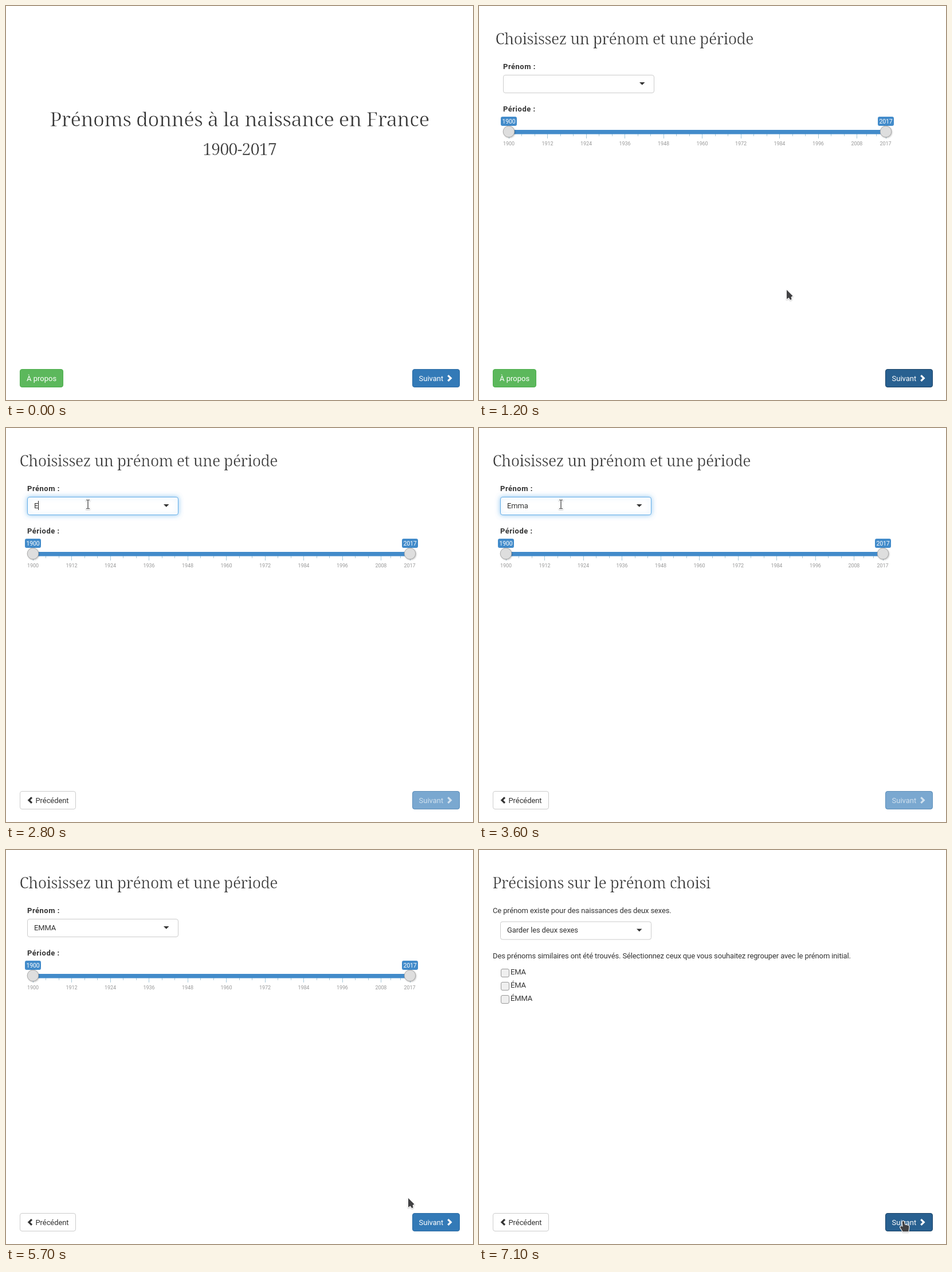
These frames come from a looping animation (815x687 px, 8 s). An HTML page with a canvas:

```html
<!DOCTYPE html>
<html lang="fr">
<head>
<meta charset="utf-8">
<title>Prénoms</title>
<style>
  html, body { margin: 0; width: 100%; height: 100%; overflow: hidden; background: #fff; }
  canvas { display: block; width: 815px; height: 687px; }
</style>
</head>
<body>
<canvas id="stage"></canvas>
<script>
const W = 815, H = 687, LOOP = 8000;
const canvas = document.getElementById('stage');
const ctx = canvas.getContext('2d');
const dpr = window.devicePixelRatio || 1;
canvas.width = W * dpr;
canvas.height = H * dpr;

const SANS = 'Roboto, sans-serif';
const SERIF = '"Noto Serif", serif';
const INK = '#333', BLUE = '#428bca';
const PAGE = 777, PAGE_MS = 400, FIRST_MOVE = 843, SECOND_MOVE = 6564.3;

// Pointer: time, hotspot x, hotspot y, kind. The screen refreshes only at these times.
const pointer = [
  [0, 0, 0, ''],
  [300, 764, 676, 'arrow'], [400, 757, 668, 'arrow'], [500, 750, 662, 'hand'],
  [600, 747, 660, 'hand'], [700, 746, 659, 'hand'],
  [900, 738, 652, 'hand'], [1000, 690, 616, 'arrow'], [1100, 616, 557, 'arrow'],
  [1200, 537, 495, 'arrow'], [1300, 440, 413, 'arrow'], [1400, 340, 322, 'arrow'],
  [1500, 248, 228, 'arrow'], [1600, 178, 156, 'arrow'], [1700, 142, 114, 'arrow'],
  [1800, 143, 121, 'hand'], [1900, 143, 127, 'hand'], [2000, 143, 131, 'hand'],
  [2100, 143, 133, 'hand'], [2300, 143, 133, 'beam'], [2800, 143, 133, 'beam'],
  [3000, 143, 133, 'beam'], [3100, 143, 133, 'beam'], [3300, 143, 133, 'beam'],
  [3600, 143, 133, 'beam'], [3700, 143, 134, 'beam'], [3800, 143, 135, 'beam'],
  [4100, 143, 151, 'beam'], [4300, 142, 174, 'hand'], [4600, 142, 174, 'arrow'],
  [5000, 402, 407, 'arrow'], [5500, 637, 559, 'arrow'], [5700, 702, 607, 'arrow'],
  [6000, 735, 638, 'hand'], [6200, 741, 647, 'hand'], [6600, 741, 647, 'hand'],
  [6800, 741, 647, 'hand'], [7100, 741, 647, 'hand']
];

const typing = [[0, ''], [2800, 'E'], [3000, 'Em'], [3100, 'Emm'], [3300, 'Emma'], [4600, 'EMMA']];
const broadList = ['EMMA', 'EMILIE', 'EMILE', 'EMMANUEL', 'EMELINE', 'EMERIC', 'EMY', 'EMILIEN'];
const exactList = ['EMMA', 'EMMANUEL', 'EMMANUELLE', 'EMMANUELA', 'EMMANUELE', 'EMMALINE', 'EMMALEE', 'EMMALYNE'];

const latest = (list, t) => list.reduce((last, item) => item[0] <= t ? item : last);

// Cubic bezier (.25, .1, .25, 1) solved by bisection.
function ease(x) {
  if (x <= 0) return 0;
  if (x >= 1) return 1;
  const curve = (s, a, b) => 3 * (1 - s) ** 2 * s * a + 3 * (1 - s) * s * s * b + s ** 3;
  let lo = 0, hi = 1;
  for (let i = 0; i < 24; i++) {
    const mid = (lo + hi) / 2;
    if (curve(mid, .25, .25) < x) lo = mid; else hi = mid;
  }
  return curve(lo, .1, 1);
}

function text(str, x, y, o = {}) {
  ctx.font = `${o.weight || 400} ${o.size || 13}px ${o.family || SANS}`;
  ctx.letterSpacing = (o.gap ?? -0.13) + 'px';
  ctx.textAlign = o.align || 'left';
  ctx.fillStyle = o.color || INK;
  ctx.fillText(str, x, y);
}

function heading(str, x, y, size, gap) {
  text(str, x, y, { size, gap, weight: 300, family: SERIF });
  // A white edge thins the letters to a light weight.
  ctx.strokeStyle = '#fff';
  ctx.lineJoin = 'round';
  ctx.lineWidth = size * 0.022;
  ctx.strokeText(str, x, y);
  ctx.lineJoin = 'miter';
}

function box(x, y, w, h, r, fill, border) {
  ctx.beginPath();
  ctx.roundRect(x + .5, y + .5, w - 1, h - 1, r - .5);
  ctx.fillStyle = fill;
  ctx.fill();
  if (border) {
    ctx.strokeStyle = border;
    ctx.lineWidth = 1;
    ctx.stroke();
  }
}

function shadow(color, blur, dx = 0, dy = 0) {
  ctx.shadowColor = color;
  ctx.shadowBlur = blur * dpr;
  ctx.shadowOffsetX = dx * dpr;
  ctx.shadowOffsetY = dy * dpr;
}
const noShadow = () => shadow('transparent', 0);

function shape(points, fill) {
  ctx.beginPath();
  points.forEach(([x, y]) => ctx.lineTo(x, y));
  ctx.closePath();
  ctx.fillStyle = fill;
  ctx.fill();
}

function chevron(x, dir, color) {
  ctx.beginPath();
  ctx.moveTo(x - dir * 2.6, 644.2);
  ctx.lineTo(x + dir * 2.4, 649);
  ctx.lineTo(x - dir * 2.6, 653.8);
  ctx.strokeStyle = color;
  ctx.lineWidth = 3.2;
  ctx.stroke();
}

function select(y, value, focused) {
  if (focused) shadow('rgba(102,175,233,.7)', 8);
  box(37, y, 264, 32, 4, '#fff', focused ? '#66afe9' : '#ccc');
  noShadow();
  shape([[275, y + 13], [284.5, y + 13], [279.75, y + 17.7]], INK);
  text(value, 49, y + 19.5);
}

function dropdown(names, query) {
  ctx.save();
  shadow('rgba(0,0,0,.175)', 10, 0, 5);
  box(37, 151, 264, 186, 3, '#fff', '#ccc');
  noShadow();
  ctx.beginPath();
  ctx.rect(38, 152, 262, 184);
  ctx.clip();
  names.forEach((name, i) => {
    const y = 156 + i * 24;
    if (!i) {
      ctx.fillStyle = '#f5f5f5';
      ctx.fillRect(38, y, 262, 24);
    }
    ctx.font = '13px ' + SANS;
    ctx.letterSpacing = '-0.13px';
    ctx.fillStyle = 'rgba(255,237,40,.4)';
    ctx.fillRect(49, y + 4, ctx.measureText(name.slice(0, query.length)).width, 16);
    text(name, 49, y + 16.5);
  });
  ctx.restore();
}

function slider() {
  const left = 47, px = 658 / 117;
  const tick = (x, h) => {
    ctx.fillStyle = '#a5c7d8';
    ctx.fillRect(Math.round(x), 223, 1, h);
  };
  const mark = (year, x) => text(year, x, 243, { size: 9, gap: -.1, color: '#999', align: 'center' });
  for (let year = 1900; year < 2017; year += 12) {
    const x = left + (year - 1900) * px;
    const step = Math.min(12, 2017 - year) * px / 3;
    tick(x, 8);
    tick(x + step, 4);
    tick(x + 2 * step, 4);
    mark(year, x);
  }
  tick(705, 8);
  mark(2017, 704.5);
  ctx.fillStyle = BLUE;
  ctx.fillRect(left, 216, 658, 7.5);
  [[left, 1900], [705, 2017]].forEach(([x, year]) => {
    ctx.beginPath();
    ctx.roundRect(x - 14, 193, 28, 16, 3);
    ctx.fillStyle = BLUE;
    ctx.fill();
    text(year, x, 205, { size: 10.5, gap: -.1, color: '#fff', align: 'center' });
    ctx.beginPath();
    ctx.arc(x, 219, 9.8, 0, 7);
    ctx.fillStyle = '#dedede';
    shadow('rgba(0,0,0,.3)', 3, 1, 1);
    ctx.fill();
    noShadow();
    ctx.strokeStyle = '#aaa';
    ctx.lineWidth = 1;
    ctx.stroke();
  });
}

function titlePage() {
  heading('Prénoms donnés à la naissance en France', 76.5, 210, 34.5, -.55);
  heading('1900-2017', 343, 260, 29, -1.1);
}

function choicePage(t) {
  const label = { weight: 700, gap: .5 };
  const value = latest(typing, t)[1];
  const focused = t >= 2300 && t < 4600;
  heading('Choisissez un prénom et une période', 23.5, 67, 26.6, -.5);
  text('Prénom :', 37, 109.5, label);
  text('Période :', 37, 183.5, label);
  slider();
  select(120, value, focused);
  if (focused && t < 3600) {
    const end = 49 + ctx.measureText(value).width;
    ctx.fillStyle = '#222';
    ctx.fillRect(Math.floor(end), 127, 1, 16);
  }
  if (t === 3000) dropdown(broadList, value);
  if (focused && t >= 3700) dropdown(exactList, value);
}

function detailPage() {
  heading('Précisions sur le prénom choisi', 23.5, 67, 26.6, -.5);
  text('Ce prénom existe pour des naissances des deux sexes.', 24, 110);
  select(124.5, 'Garder les deux sexes', false);
  text('Des prénoms similaires ont été trouvés. Sélectionnez ceux que vous souhaitez regrouper avec le prénom initial.', 24, 188.5);
  ['EMA', 'ÉMA', 'ÉMMA'].forEach((name, i) => {
    const y = i * 23;
    box(38, 207 + y, 15, 15, 3, '#efefef', '#999');
    text(name, 55, 216.5 + y);
  });
}

function buttons(t) {
  if (t < 1400) {
    box(24, 633, 76, 32, 4, '#5cb85c', '#4cae4c');
    text('À propos', 36, 653.5, { color: '#fff', gap: 0 });
  } else {
    box(24, 633, 98, 32, 4, '#fff', '#ccc');
    chevron(42.4, -1, INK);
    text('Précédent', 51.5, 653.5, { gap: -.08 });
  }
  const dark = (t >= 400 && t < 1400) || t >= 6000;
  const edge = t >= 900 ? '#1b4367' : '#204d74';
  ctx.globalAlpha = t >= 1400 && t < 5500 ? .65 : 1;
  box(709, 633, 83, 32, 4, dark ? '#286090' : '#337ab7', dark ? edge : '#2e6da4');
  text('Suivant', 720.5, 653.5, { color: '#fff', gap: 0 });
  chevron(773.9, 1, '#fff');
  ctx.globalAlpha = 1;
}

const cursors = {
  arrow: 'M0 0V16L3.6 13.6L6.4 17.4L8.6 16.2L7.6 12.4L10.5 10.4Z',
  hand: 'M-2.4 1.2Q-.8-1.2 1 1.2L2.2 6.4L8 7.6Q9.8 8.2 9.4 11L8.4 18.2H-1.4L-5.8 11Q-6 8.4-3.4 9L-1.4 10Z',
  beam: 'M-3-8H-.8L0-7.4L.8-8H3V-7H.6V7H3V8H.8L0 7.4L-.8 8H-3V7H-.6V-7H-3Z'
};

function drawPointer(x, y, kind) {
  if (!kind) return;
  const path = new Path2D(cursors[kind]);
  ctx.save();
  ctx.translate(x, y);
  ctx.lineJoin = 'round';
  ctx.strokeStyle = 'rgba(255,255,255,.9)';
  ctx.lineWidth = 2.4;
  shadow('rgba(0,0,0,.25)', 2, 0, 1);
  ctx.stroke(path);
  noShadow();
  ctx.fillStyle = '#414143';
  ctx.fill(path);
  ctx.restore();
}

function draw(now) {
  const [t, x, y, kind] = latest(pointer, now % LOOP);
  const scroll = PAGE * (ease((t - FIRST_MOVE) / PAGE_MS) + ease((t - SECOND_MOVE) / PAGE_MS));
  ctx.setTransform(dpr, 0, 0, dpr, 0, 0);
  ctx.fillStyle = '#fff';
  ctx.fillRect(0, 0, W, H);
  ctx.save();
  ctx.beginPath();
  ctx.rect(24, 0, 768, 620);
  ctx.clip();
  [titlePage, choicePage, detailPage].forEach((page, i) => {
    const shift = Math.round(i * PAGE - scroll);
    if (Math.abs(shift) >= PAGE) return;
    ctx.save();
    ctx.translate(shift, 0);
    page(t);
    ctx.restore();
  });
  ctx.restore();
  buttons(t);
  drawPointer(x, y, kind);
}

const start = performance.now();
function loop() {
  draw(performance.now() - start);
  requestAnimationFrame(loop);
}
loop();
</script>
</body>
</html>
```
